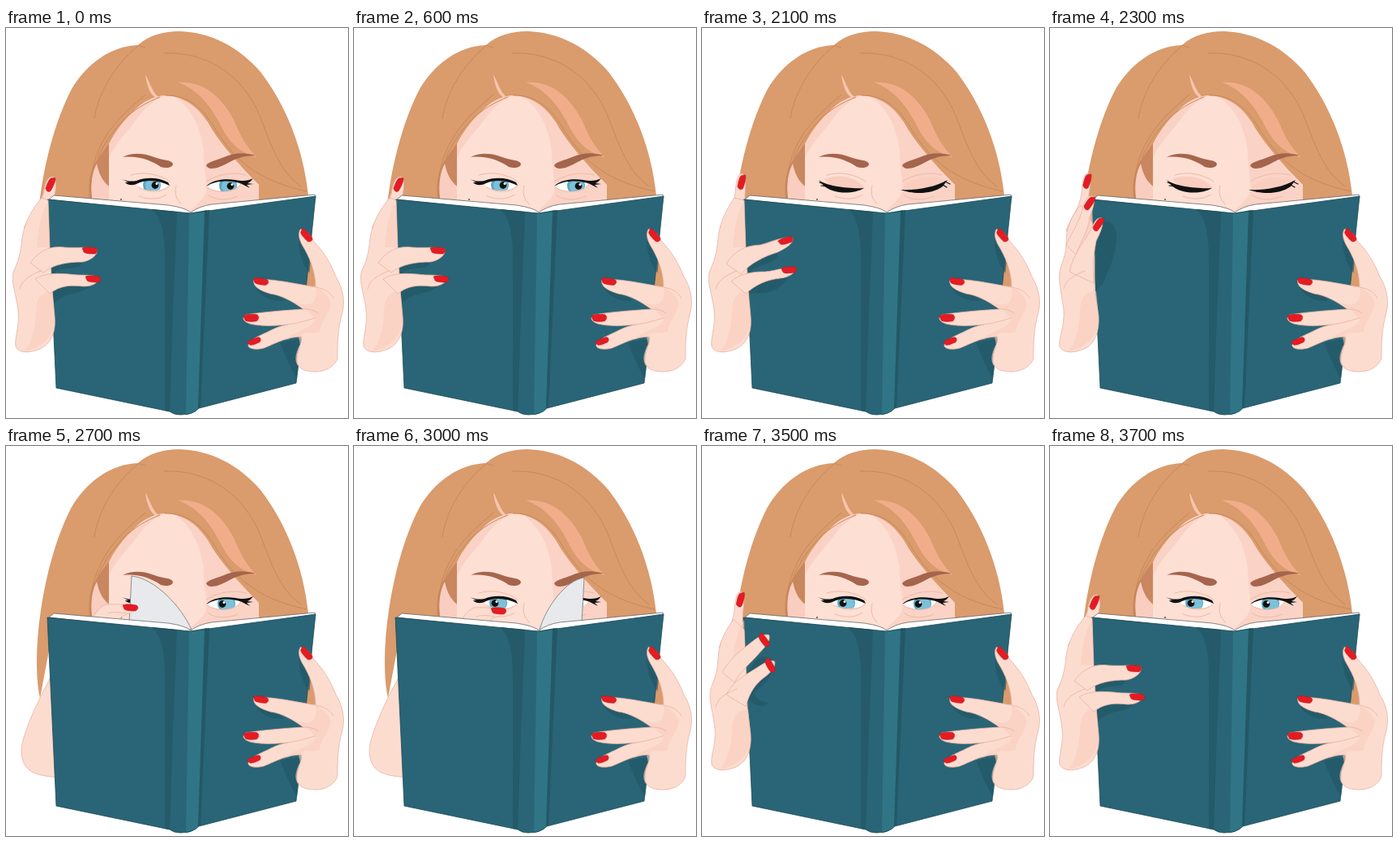
Animation, 422 px wide and 480 px high, one loop 3.8 s. Source, as an HTML page:

```html
<!DOCTYPE html>
<html lang="en">
<head>
<meta charset="utf-8">
<title>Reading</title>
<style>
html, body { margin: 0; width: 100%; height: 100%; overflow: hidden; background: #fff; }
svg { display: block; width: 422px; height: 480px; }
.skin { fill: #fddcd0; stroke: #e5b3a2; stroke-width: .8; stroke-linejoin: round; }
.tone { fill: #f9cdbf; }
.line { fill: none; stroke: #efb9a6; stroke-width: 1; stroke-linecap: round; }
.hair { fill: #da9b6d; }
.strand { fill: none; stroke: #c78654; stroke-width: .9; }
.brow { fill: #a5654c; }
.ink { fill: #111; }
.lash { fill: none; stroke: #111; stroke-width: 1.2; stroke-linecap: round; }
.nail { fill: #e51b23; stroke: #a81a1c; stroke-width: .4; }
.cover { fill: #296576; }
.dark { fill: #235866; }
.edge { fill: none; stroke: #1b4854; stroke-width: .8; }
.paper { fill: #fff; stroke: #555; stroke-width: .7; }
</style>
</head>
<body>
<svg viewBox="0 0 422 480">
  <defs>
    <path id="nail" class="nail" d="M-9 -3C-5 -5 3 -4 8 -3C11 -1 10 2 7 4C1 4 -4 4 -7 2Z"/>
    <clipPath id="eyeL"><path d="M160 191C168 184 186 184 201 193C197 199 187 200 177 200C169 199 163 196 160 191Z"/></clipPath>
    <clipPath id="eyeR"><path d="M248 195C258 186 277 184 290 190C287 197 281 201 271 201C261 201 253 199 248 195Z"/></clipPath>
  </defs>

  <!-- hair and face -->
  <path class="hair" d="M42 310C36 285 37 240 43 202C49 160 62 112 80 77C98 45 129 22 163 21C176 9 195 4 214 4C252 5 287 23 314 54C345 94 367 148 373 206L383 318L358 320L330 215L60 215Z"/>
  <path d="M103 210C101 188 105 172 114 160L130 138L134 210Z" fill="#c98760"/>
  <path d="M106 210C104 192 106 178 112 167C115 182 121 191 130 197L130 212Z" fill="#f9cdbf"/>
  <path d="M127 211L127 143C134 129 144 115 156 104C167 92 180 84 196 83C217 83 237 98 249 116C262 140 286 167 312 193L312 212L228 228Z" fill="#fddfd4"/>
  <path class="tone" d="M127 143C134 129 144 115 156 104C167 92 180 84 196 83C178 91 169 102 160 114C150 128 136 140 127 160Z" opacity=".7"/>
  <path class="tone" d="M208 84C232 91 241 104 249 116C262 140 286 167 312 193L312 212L226 226C241 211 250 208 247 187C243 166 246 151 240 132C235 112 224 96 208 84Z" opacity=".65"/>
  <path d="M172 57C178 68 181 81 190 86C181 88 174 75 172 57Z" fill="#f8c5ad"/>
  <path d="M212 67C242 64 266 84 281 113C290 134 298 149 310 159C292 155 276 143 265 120C253 97 238 76 212 67Z" fill="#f1ad8a"/>
  <path class="strand" d="M163 21C166 23 169 23 172 24M163 22C132 47 113 83 109 112M172 82C150 101 121 124 109 165C104 180 104 196 105 208M190 85C156 98 132 120 113 160M196 83C217 82 240 93 256 121C278 157 305 187 371 201M195 31C244 29 288 54 311 103C325 136 334 174 364 195"/>

  <!-- eyes -->
  <path class="brow" d="M144 159C155 153 170 154 183 159C193 163 204 162 206 167C206 172 198 173 191 171C179 163 164 157 144 159Z"/>
  <path class="brow" d="M247 169C250 164 260 163 269 159C281 153 296 153 308 157C292 157 283 161 274 166C262 173 249 176 247 169Z"/>
  <path class="line" d="M154 181C169 176 190 180 202 189M247 189C262 179 283 177 296 181M164 207C177 212 190 211 198 205M250 206C259 213 276 212 286 207M210 194C207 205 211 211 216 217"/>
  <g id="open">
    <g clip-path="url(#eyeL)"><path fill="#fff" d="M155 180h50v25h-50z"/>
      <g class="iris"><circle cx="178" cy="193" r="11" fill="#5aa6c4"/><circle cx="179" cy="194" r="9" fill="#7dc1d8"/></g>
      <g class="pupil"><circle cx="174" cy="193.5" r="4.4" class="ink"/><circle cx="176" cy="191.5" r="1.5" fill="#fff"/></g></g>
    <g clip-path="url(#eyeR)"><path fill="#fff" d="M245 180h50v25h-50z"/>
      <g class="iris"><circle cx="272" cy="194" r="11" fill="#5aa6c4"/><circle cx="273" cy="195" r="9" fill="#7dc1d8"/></g>
      <g class="pupil"><circle cx="267" cy="194.5" r="4.4" class="ink"/><circle cx="269" cy="192.5" r="1.5" fill="#fff"/></g></g>
    <path class="ink" d="M143 186C150 189 155 189 161 188C173 183 189 184 200 190L202 194C189 187 173 186 163 191C156 195 149 193 147 190L151 190Z"/>
    <path class="ink" d="M247 195C254 187 269 185 283 187C293 189 299 188 305 185C302 189 300 190 298 191L305 192L297 193L301 197L291 192C279 187 259 187 247 195Z"/>
    <path class="line" d="M164 196C175 203 192 203 201 195M248 196C258 203 280 205 290 192"/>
  </g>
  <g id="closed">
    <path class="tone" d="M151 186C168 178 192 184 201 197C185 202 161 201 151 186ZM247 199C255 184 281 180 298 187C290 203 262 203 247 199Z"/>
    <path class="ink" d="M144 187C154 195 182 198 200 197C187 205 161 205 149 193ZM245 199C264 200 288 196 303 187L297 195C282 206 258 204 245 199Z"/>
    <path class="lash" d="M145 190L150 192M147 194L154 195M300 189L306 192M297 193L302 196"/>
  </g>
  <circle cx="142" cy="211" r="1" fill="#70452f"/>

  <!-- page and far arm -->
  <path id="page" fill="#e7e9ec" stroke="#777" stroke-width=".8"/>
  <path id="arm" class="skin" d="M56 283C44 306 30 331 21 362C16 381 21 396 34 402C43 406 54 407 66 408Z"/>
  <g id="pinch">
    <path class="skin" d="M104 218C109 207 114 199 123 195C138 194 151 196 162 198C163 202 157 204 149 207C143 209 139 213 137 219Z"/>
    <path class="line" d="M126 206C134 203 141 205 148 206"/>
    <use href="#nail" x="153" y="199"/>
  </g>
  <path id="index" class="skin"/>
  <use id="nail0" href="#nail"/>
  <path id="palm2" class="skin" d="M58 213C64 203 72 191 71 181C68 174 60 180 56 189C51 204 43 214 36 222C31 212 37 204 29 207C23 219 26 229 23 227C17 228 14 243 11 264C9 297 16 321 20 345C22 366 11 386 15 397C38 397 55 387 62 364L66 350Z"/>
  <path id="palm2line" class="line" d="M23 227C22 245 25 259 27 270M36 222C31 236 30 247 32 258M54 236C38 256 31 284 39 309"/>

  <!-- book -->
  <path class="paper" d="M53 211L59 206L200 218Q221 221 228 227Q239 219 254 217L381 205L382 209L230 230Z"/>
  <path class="cover" d="M51 211L228 228L382 207L358 437L238 468Q231 476 215 476Q207 476 202 472L62 443Z"/>
  <path class="dark" d="M180 223C198 239 196 270 196 311L196 471L202 472L206 350L211 226Z" opacity=".8"/>
  <path d="M226 228L248 224L237 468Q231 475 222 476Z" fill="#307586"/>
  <path class="dark" d="M245 225L251 224L240 467L237 468Z"/>
  <path class="edge" d="M51 211L228 228L382 207M51 211L62 443L202 472Q207 476 215 476Q231 476 238 468L358 437L382 207"/>

  <!-- near hand, right -->
  <path class="dark" d="M308 319C314 331 328 337 343 336L334 326ZM338 387C345 405 352 420 359 432L366 382ZM362 256C360 272 364 289 375 302L379 270Z" opacity=".7"/>
  <path class="hair" d="M377 275L382 302L383 318L373 317Z"/>
  <path class="skin" d="M363 248C369 246 377 256 380 263C391 274 401 290 407 306C417 322 418 338 415 350C409 371 409 390 409 407C405 417 394 423 382 423C370 423 361 420 359 411C358 399 365 389 365 380C346 380 333 388 318 394C306 397 298 394 299 390C302 383 312 379 323 374C332 369 341 366 348 365C329 367 313 367 301 364C292 361 291 356 296 353C314 350 336 348 367 346C354 337 341 329 326 327C313 323 304 318 306 310C327 308 347 313 382 319C382 299 374 281 366 268C362 261 360 254 363 248Z"/>
  <path class="tone" d="M382 319C391 323 399 330 401 340C398 355 388 361 387 374C376 378 368 371 361 382C366 391 357 403 361 417C351 404 365 390 365 380C360 378 352 381 345 384C355 372 377 371 382 359C374 346 360 341 350 335C364 341 386 348 382 319Z" opacity=".6"/>
  <path class="line" d="M382 319C393 321 400 325 404 332M348 365C361 363 372 360 381 357M367 346C374 346 380 347 385 351"/>
  <use href="#nail" transform="translate(314 312) rotate(5)"/>
  <use href="#nail" transform="translate(302 357) rotate(-6) scale(1 1.15)"/>
  <use href="#nail" transform="translate(306 386) rotate(-25) scale(.9)"/>
  <use href="#nail" transform="translate(370 255) rotate(44)"/>

  <!-- near hand, left -->
  <g id="front">
    <path id="shade" class="dark" opacity=".7"/>
    <path id="palm" class="skin"/>
    <path class="tone" d="M52 214C44 227 39 245 38 270L54 270ZM57 324C44 324 37 332 37 350C36 372 30 390 22 398C45 395 62 376 60 355Z" opacity=".6"/>
    <path id="ring" class="skin"/>
    <path id="middle" class="skin"/>
    <path class="line" d="M43 299C29 304 19 311 17 321"/>
    <use id="nail1" href="#nail"/>
    <use id="nail2" href="#nail"/>
  </g>
</svg>

<script>
const $ = id => document.getElementById(id);
const parts = ["index", "palm", "middle", "ring", "shade"];

// Every pose shares one path structure, so poses can be blended.
const rest = {
  index: "M46 204C48 193 50 184 57 183C63 184 62 197 60 205L52 245L22 246C27 234 40 222 46 204Z",
  palm: "M44 209C33 222 23 238 20 258C18 279 15 288 9 300C6 313 13 329 15 348C17 369 10 382 12 392C16 401 30 400 42 395C55 389 62 375 60 355L57 322L54 272L52 212Z",
  middle: "M30 289C42 273 55 268 72 270C87 271 103 269 112 272C114 279 105 286 94 288C77 288 60 290 46 301Z",
  ring: "M36 309C48 301 65 302 78 303C92 305 107 303 114 307C115 313 107 318 96 318C79 316 66 317 54 327Z",
  shade: "M57 290L70 288C80 289 90 289 94 288C90 300 76 292 60 300C70 320 90 316 104 317C92 330 76 322 58 340Z",
  nails: [[55, 192, 110], [103, 274, 0], [107, 309, 0]]
};
const raised = {
  index: "M41 203C42 191 43 181 49 179C55 181 54 194 53 205L52 245L22 246C26 234 39 222 41 203Z",
  palm: "M40 209C31 222 22 238 20 258C18 279 15 288 9 300C6 313 13 329 15 348C17 369 10 382 12 392C16 401 30 400 42 395C55 389 62 375 60 355L57 322L54 272L52 212Z",
  middle: "M30 290C42 272 55 268 72 267C86 263 102 256 112 258C114 264 104 271 93 276C77 281 60 289 48 303Z",
  ring: "M36 312C48 301 65 300 78 300C92 299 107 292 115 296C116 301 107 307 96 308C79 310 66 316 54 327Z",
  shade: "M57 290L70 284C80 281 90 278 93 276C95 289 78 289 60 298C70 312 90 309 106 308C92 328 76 327 58 326Z",
  nails: [[49, 189, 100], [103, 262, -20], [107, 298, -8]]
};
const lifted = {
  index: "M39 203C40 191 41 181 46 179C51 181 50 194 48 205L48 245L20 250C24 235 37 222 39 203Z",
  palm: "M38 218C26 232 20 246 20 264C20 281 15 286 12 300C10 314 15 329 17 348C18 369 10 382 12 392C16 401 30 400 42 395C55 389 61 375 60 355L55 322L55 282L52 240Z",
  middle: "M20 267C26 253 35 241 40 224C42 215 46 205 53 207C57 213 52 224 49 233C48 249 38 261 32 279Z",
  ring: "M24 300C29 277 41 265 49 251C53 242 57 232 64 234C67 241 62 252 57 262C55 274 52 288 54 314Z",
  shade: "M55 270L62 244C70 229 84 243 82 260C80 286 70 302 68 309C65 317 60 319 57 324C56 320 56 310 55 300Z",
  nails: [[46, 188, 102], [49, 215, 120], [60, 241, 120]]
};

const mix = (a, b, k) => a + (b - a) * k;
function blend(a, b, k) {
  const pose = { nails: a.nails.map((n, i) => n.map((v, j) => mix(v, b.nails[i][j], k))) };
  for (const p of parts) {
    const to = b[p].match(/-?[\d.]+/g);
    let i = 0;
    pose[p] = a[p].replace(/-?[\d.]+/g, v => mix(+v, +to[i++], k));
  }
  return pose;
}
const halfway = blend(raised, lifted, .5);

function show(id, on) { $(id).style.display = on ? "" : "none"; }

function setHand(pose) {
  for (const p of parts) $(p).setAttribute("d", pose[p]);
  pose.nails.forEach(([x, y, r], i) =>
    $("nail" + i).setAttribute("transform", `translate(${x} ${y}) rotate(${r})`));
}

function setPage(x, y) {
  const bend = (228 - x) * .4;
  $("page").setAttribute("d",
    `M${x} ${y}C${x + bend} ${y + 3} ${228 - bend * .4} 198 229 226L${x - 3} 218Z`);
}

// Page corner and pinching hand offset for each 100 ms step from 2600 ms.
const turn = [[108, 190, -45, 8], [155, 160, 0, 0], [188, 148, 30, -6], [236, 146, 62, -4],
              [284, 162, 25, 4], [322, 188, -30, 10]];
const handSteps = { 7: raised, 8: halfway, 9: lifted, 10: lifted, 21: halfway, 22: raised };

function draw(step) {
  const away = step < 3;
  for (const [name, x] of [["iris", away ? 2 : 0], ["pupil", away ? 10 : 0]])
    for (const el of document.getElementsByClassName(name))
      el.setAttribute("transform", `translate(${x} 0)`);

  const closed = step >= 7 && step <= 10;
  show("open", !closed);
  show("closed", closed);

  const near = step <= 10 || step >= 21;
  const palmBack = step === 11 || (step >= 18 && step <= 20);
  for (const id of ["front", "index", "nail0"]) show(id, near);
  show("palm2", palmBack);
  show("palm2line", palmBack);
  if (near) setHand(handSteps[step] || rest);

  const t = turn[step - 12];
  show("page", t);
  show("pinch", t);
  show("arm", step >= 12 && step <= 17);
  if (t) {
    setPage(t[0], t[1]);
    $("pinch").setAttribute("transform", `translate(${t[2]} ${t[3]})`);
  }
}

let last = -1;
function tick() {
  const t = performance.now() % 3800;
  const step = t < 2100 ? Math.floor(t / 300) : 7 + Math.floor((t - 2100) / 100);
  if (step !== last) draw(last = step);
  requestAnimationFrame(tick);
}
tick();
</script>
</body>
</html>
```
